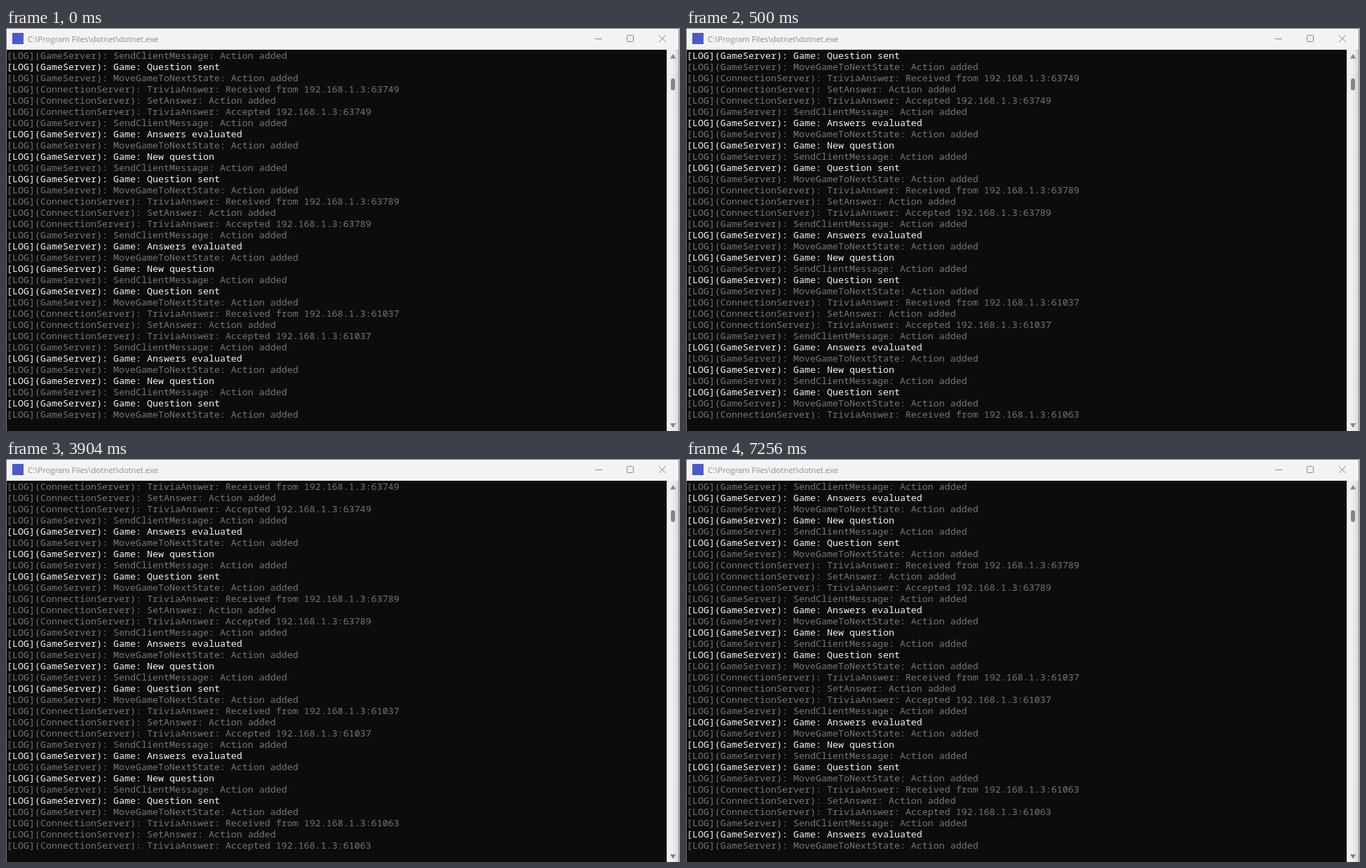
Recreate the animation shown at these times as an HTML page. Size 961 by 575 pixels, loop 8 s.

```html
<!DOCTYPE html>
<html lang="en">
<head>
<meta charset="utf-8">
<title>Server log</title>
<style>
  html, body { margin: 0; width: 100%; height: 100%; overflow: hidden; background: #0c0c0c; }
  svg { display: block; width: 961px; height: 575px; }
  #log { font: 13.3333px "Noto Sans Mono", "DejaVu Sans Mono", monospace; fill: #767676; }
  #log .bright { fill: #f2f2f2; }
  .title { font: 11.35px "Open Sans", "Noto Sans", sans-serif; fill: #87908a; }
  .controls { fill: none; stroke: #868686; }
</style>
</head>
<body>
<svg viewBox="0 0 961 575">
  <defs>
    <linearGradient id="edge">
      <stop offset="0" stop-color="#f2f2f2"/>
      <stop offset=".6" stop-color="#ececec"/>
      <stop offset="1" stop-color="#d2d2d2"/>
    </linearGradient>
  </defs>
  <rect width="961" height="575" fill="#0c0c0c"/>
  <rect width="961" height="31" fill="#f3f3f3"/>
  <rect x="942" y="31" width="17" height="544" fill="url(#edge)"/>
  <path d="M0 .5H960M.5 0V575M959.5 0V575" stroke="#777" fill="none"/>
  <rect x="960" width="1" height="575" fill="#c8c8c8"/>

  <rect x="9" y="7" width="16" height="16" fill="#4d5bc9"/>
  <text class="title" x="31" y="20">C:\Program Files\dotnet\dotnet.exe</text>
  <g class="controls">
    <path d="M840 15.5H850"/>
    <rect x="885.5" y="10.5" width="9" height="9" rx="1"/>
    <path d="M931 10.5L940.5 20M940.5 10.5L931 20"/>
  </g>

  <g fill="#858585">
    <path d="M947 43.5L951 37L955 43.5Z"/>
    <path d="M947 564L951 570.5L955 564Z"/>
    <rect id="thumb" x="948" y="72" width="6" height="17" rx="3"/>
  </g>
  <g id="log"></g>
</svg>
<script>
const LOOP = 8000, ROWS = 33, ROW_HEIGHT = 16, FIRST_BASELINE = 44;
const PORTS = [63749, 63789, 61037, 61063];
const game = text => `[LOG](GameServer): ${text}`;
const connection = text => `[LOG](ConnectionServer): ${text}`;

// One trivia round, repeated with a new client port each time.
const round = port => [
  game("SendClientMessage: Action added"),
  game("Game: Question sent"),
  game("MoveGameToNextState: Action added"),
  connection(`TriviaAnswer: Received from 192.168.1.3:${port}`),
  connection("SetAnswer: Action added"),
  connection(`TriviaAnswer: Accepted 192.168.1.3:${port}`),
  game("SendClientMessage: Action added"),
  game("Game: Answers evaluated"),
  game("MoveGameToNextState: Action added"),
  game("Game: New question"),
];
const lines = PORTS.flatMap(round);

// Time in ms, and the number of lines scrolled off the top from then on.
const scrolls = [[0, 0], [500, 1], [550, 3], [6140, 6]];

const log = document.getElementById("log");
const thumb = document.getElementById("thumb");
const rows = Array.from({ length: ROWS }, (_, i) => {
  const row = document.createElementNS("http://www.w3.org/2000/svg", "text");
  row.setAttribute("x", 1);
  row.setAttribute("y", FIRST_BASELINE + i * ROW_HEIGHT);
  return log.appendChild(row);
});

let shown = -1;
function render(time) {
  const top = scrolls.findLast(([start]) => time >= start)[1];
  if (top === shown) return;
  shown = top;
  rows.forEach((row, i) => {
    const line = lines[top + i];
    row.textContent = line;
    row.setAttribute("class", line.includes(" Game: ") ? "bright" : "");
  });
  thumb.setAttribute("y", top < 3 ? 72 : 73);
}

const start = performance.now();
function frame() {
  render((performance.now() - start) % LOOP);
  requestAnimationFrame(frame);
}
frame();
</script>
</body>
</html>
```
